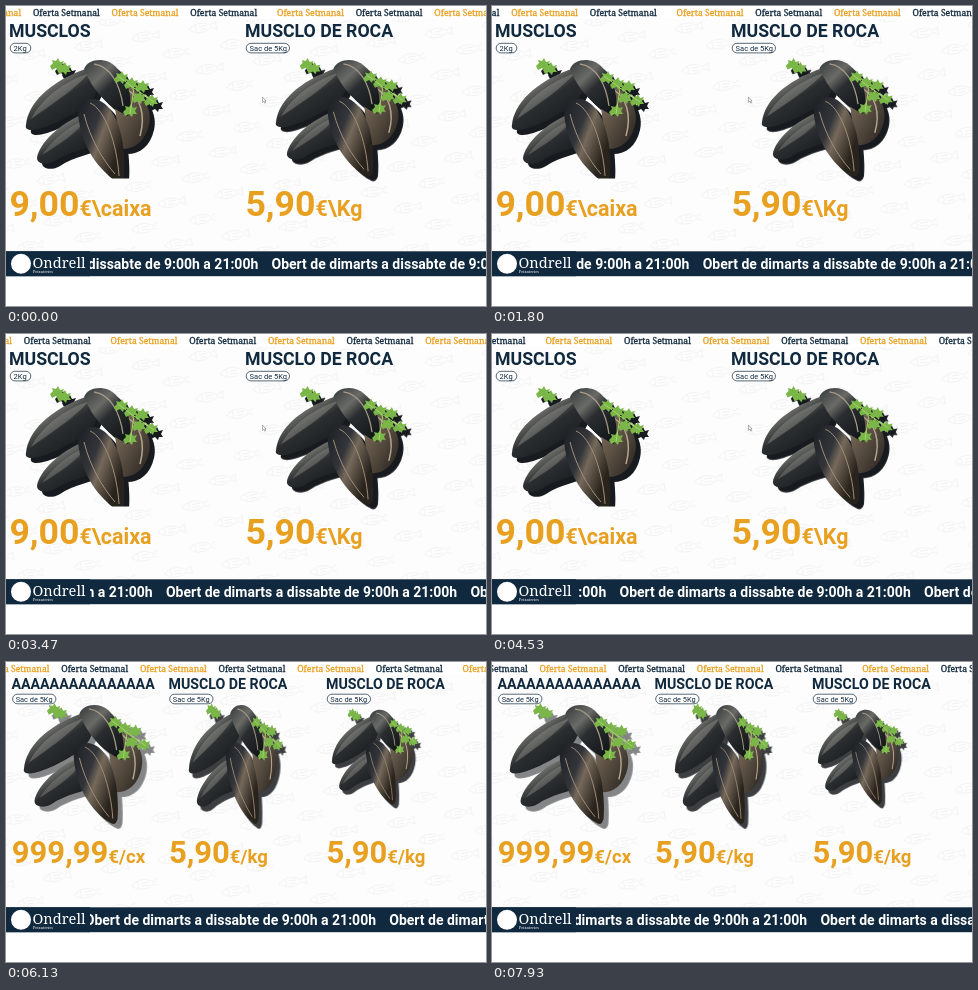
An HTML page that plays this animation: 480 by 300 pixels, repeating every 8 s.

```html
<!DOCTYPE html>
<html lang="ca">
<head>
<meta charset="utf-8">
<title>Oferta Setmanal</title>
<style>
html, body { margin: 0; width: 100%; height: 100%; overflow: hidden; background: #fff; }
svg { display: block; width: 100vw; height: 100vh; }
text { font-family: Roboto, sans-serif; white-space: pre; }
.title { font-weight: 700; fill: #10293e; }
.price { font-weight: 700; fill: #e8a020; }
.tag { font-weight: 400; fill: #10293e; }
.slab { font: 500 8.65px "Noto Serif", serif; stroke-width: .3px; }
.hours { font-weight: 700; font-size: 14px; fill: #fff; }
.brand { font-family: "Noto Serif", serif; fill: #fff; }
</style>
</head>
<body>
<svg viewBox="0 0 480 300">
  <defs>
    <pattern id="sea" width="58" height="42" patternUnits="userSpaceOnUse" patternTransform="rotate(-9)">
      <g fill="none" stroke="#f0f0f0" stroke-width=".9">
        <path id="fish" d="M3 10C9 4 19 4 25 9L31 6Q29 10 31 14L25 11C19 16 9 16 3 10ZM9 6.500Q12 10 9 13.500M13 8.500H21M13 11.500H20"/>
        <use href="#fish" x="28" y="21"/>
      </g>
    </pattern>
    <linearGradient id="shell" x1="0" y1="0" x2=".8" y2="1">
      <stop offset="0" stop-color="#34383a"/>
      <stop offset=".35" stop-color="#6a6b67"/>
      <stop offset=".55" stop-color="#2b2e30"/>
      <stop offset="1" stop-color="#131618"/>
    </linearGradient>
    <linearGradient id="front" x1="0" y1="0" x2=".9" y2=".6">
      <stop offset="0" stop-color="#1b1f22"/>
      <stop offset=".45" stop-color="#33353a"/>
      <stop offset=".62" stop-color="#75695a"/>
      <stop offset="1" stop-color="#29231d"/>
    </linearGradient>
    <linearGradient id="back" x1="0" y1="0" x2="1" y2="1">
      <stop offset="0" stop-color="#8d7c66"/>
      <stop offset=".5" stop-color="#5a4f43"/>
      <stop offset="1" stop-color="#25211d"/>
    </linearGradient>
    <clipPath id="crop"><rect x="14" y="48" width="150" height="124.500"/></clipPath>
    <path id="leaf" d="M-7 1L-4 -2L-5 -5L-1 -4L1 -7L3 -3L7 -4L5 0L7 3L3 3L2 6L-1 3L-5 5Z"/>
    <g id="mussels">
      <g fill="#7ab648">
        <use href="#leaf" x="51" y="59"/>
        <use href="#leaf" x="58" y="63"/>
      </g>
      <path d="M106 76C132 78 148 100 143 119C139 136 128 144 114 143Z" fill="url(#back)"/>
      <path d="M122 84C134 92 140 108 134 130" fill="none" stroke="#b5a68e" stroke-width="1.500"/>
      <path d="M20 119C22 98 42 76 82 62C98 62 96 84 82 98C64 112 36 124 26 124C21 124 19 122 20 119Z" fill="url(#shell)"/>
      <path d="M25 113C36 92 58 76 83 67C70 82 48 97 25 113Z" fill="#9b9b94" opacity=".4"/>
      <path d="M78 63C82 52 100 51 109 60C122 73 128 92 122 110C106 103 88 88 78 63Z" fill="url(#shell)"/>
      <path d="M88 58C104 60 114 78 117 100" fill="none" stroke="#a59a86" stroke-width="1.300"/>
      <path d="M31 152C33 138 53 117 80 107L96 138C81 142 63 146 49 155C41 160 31 158 31 152Z" fill="url(#shell)"/>
      <path d="M36 149C47 133 62 121 80 113C70 128 54 138 36 149Z" fill="#9b9b94" opacity=".35"/>
      <path d="M72 106C72 93 87 88 99 98C114 111 120 140 118 170Q116 178 110 174C91 163 74 138 72 106Z" fill="url(#front)"/>
      <path d="M84 97C99 103 111 138 113 170M78 108C84 132 96 153 109 168" fill="none" stroke="#a08f78" stroke-width="1"/>
      <g fill="#7ab648">
        <use href="#leaf" x="115" y="72"/>
        <use href="#leaf" x="125" y="78"/>
        <use href="#leaf" x="136" y="81"/>
        <use href="#leaf" x="133" y="92"/>
        <use href="#leaf" x="145" y="95"/>
        <use href="#leaf" x="124" y="105"/>
        <path d="M112 70L128 82L148 96M128 82L124 108" fill="none" stroke="#a9d36c"/>
      </g>
    </g>
  </defs>
  <rect width="480" height="300" fill="#fff"/>
  <rect y="13" width="480" height="232" fill="#fdfdfd"/>
  <rect y="13" width="480" height="232" fill="url(#sea)"/>
  <g id="pair">
    <path d="M256.500 91V96.500L257.800 95.300L258.700 97.200L259.500 96.800L258.600 95H260Z" fill="#fff" stroke="#666" stroke-width=".5"/>
  </g>
  <g id="trio"></g>
  <g id="top"></g>
  <rect y="245.300" width="480" height="24.900" fill="#10293e"/>
  <g id="bottom"></g>
  <rect y="245.300" width="84" height="24.900" fill="#10293e"/>
  <circle cx="15" cy="257.700" r="10" fill="#fff"/>
  <text class="brand" x="26.500" y="262" font-size="14.600" style="font-weight:500">Ondrell</text>
  <text class="brand" x="27" y="267.300" font-size="3.800">Peixateries</text>
</svg>
<script>
const NAVY = '#10293e', ORANGE = '#e8a020';
const LOOP = 8000, SWITCH = 5730, FPS = 15;
const $ = id => document.getElementById(id);

function add(parent, tag, attrs, content = '') {
  const el = document.createElementNS('http://www.w3.org/2000/svg', tag);
  for (const key in attrs) el.setAttribute(key, attrs[key]);
  el.textContent = content;
  parent.appendChild(el);
  return el;
}

// Places the mussels with their left, top corner at x, y.
function mussels(parent, x, y, sx, sy, shade, crop) {
  const g = add(parent, 'g', {
    transform: `translate(${x} ${y}) scale(${sx} ${sy}) translate(-20 -53)`
  });
  if (crop) g.setAttribute('clip-path', 'url(#crop)');
  add(g, 'use', { href: '#mussels', style: `filter: drop-shadow(5px 5px 0 rgba(11, 14, 18, ${shade}))` });
}

function product(parent, x, name, tag, price, unit, look) {
  const { title, titleY, tagY, tagSize, pad, amount, priceY } = look;
  add(parent, 'text', { class: 'title', x, y: titleY, 'font-size': title }, name);
  add(parent, 'rect', {
    x: x + 1.2, y: tagY, width: tag.length > 4 ? 43.3 : 20.6, height: 9.6, rx: 4.8,
    fill: '#fff', stroke: NAVY, 'stroke-width': .7
  });
  add(parent, 'text', { class: 'tag', x: x + pad, y: tagY + 7.5, 'font-size': tagSize }, tag);
  const line = add(parent, 'text', { class: 'price', x: x + .4, y: priceY, 'font-size': amount }, price);
  add(line, 'tspan', { 'font-size': amount * .6 }, unit);
}

const large = { title: 17.7, titleY: 31, tagY: 37.3, tagSize: 7.5, pad: 4.6, amount: 35.7, priceY: 209.5 };
const small = { title: 14.2, titleY: 27, tagY: 32.2, tagSize: 7.4, pad: 4.3, amount: 31, priceY: 201 };
const ROCK = 'MUSCLO DE ROCA', SACK = 'Sac de 5Kg';

const pair = $('pair'), trio = $('trio');
product(pair, 3, 'MUSCLOS', '2Kg', '9,00', '€\\caixa', large);
product(pair, 239, ROCK, SACK, '5,90', '€\\Kg', large);
mussels(pair, 20, 53, 1, 1, .95, true);
mussels(pair, 270, 53, .99, .96, .95);

product(trio, 5.4, 'A'.repeat(15), SACK, '999,99', '€/cx', small);
product(trio, 162.5, ROCK, SACK, '5,90', '€/kg', small);
product(trio, 320, ROCK, SACK, '5,90', '€/kg', small);
mussels(trio, 18, 42, .955, .98, .5);
mussels(trio, 183, 42, .71, .98, .8);
mussels(trio, 326, 47, .65, .78, .8);

// Both tickers move by one block in ten seconds.
const TOP = 480, BOTTOM = 304.5, LAP = 10000;
for (let b = -1; b < 2; b++) {
  for (let i = 0; i < 6; i++) {
    const color = i % 2 ? NAVY : ORANGE;
    add($('top'), 'text', { class: 'slab', x: b * TOP + i * 78.65, y: 9.7, fill: color, stroke: color }, 'Oferta Setmanal');
  }
  add($('bottom'), 'text', { class: 'hours', x: b * BOTTOM, y: 262.8 }, 'Obert de dimarts a dissabte de 9:00h a 21:00h');
}

const slide = (id, x) => $(id).setAttribute('transform', `translate(${x.toFixed(2)} 0)`);
const show = (el, on) => el.setAttribute('visibility', on ? 'visible' : 'hidden');

function draw(time) {
  const t = Math.floor((time % LOOP + 5) * FPS / 1000) * 1000 / FPS;
  slide('top', 271 - TOP * t / LAP);
  slide('bottom', 265.5 - BOTTOM * t / LAP);
  show(pair, t < SWITCH);
  show(trio, t >= SWITCH);
}

const start = performance.now();
function tick() {
  draw(performance.now() - start);
  requestAnimationFrame(tick);
}
tick();
</script>
</body>
</html>
```
